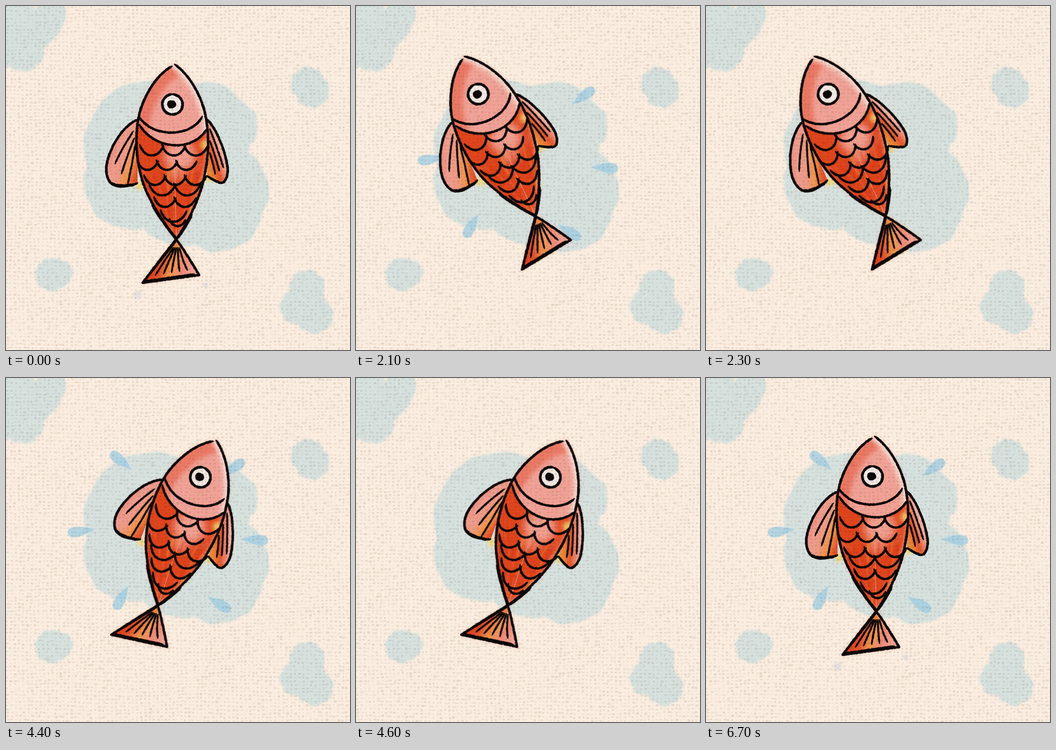
These frames come from a looping animation (748 px wide and 748 px high, 6.8 s). An HTML page with a canvas:

```html
<!DOCTYPE html>
<html lang="en">
<head>
<meta charset="utf-8">
<title>Fish</title>
<style>
  html, body { margin: 0; width: 100%; height: 100%; overflow: hidden; background: #faeddf; }
  main { position: fixed; inset: 0; overflow: clip; contain: strict; isolation: isolate; }
  canvas { position: absolute; left: 0; top: 0; width: 748px; height: 748px; transform-origin: 0 0; }
  .weave { mix-blend-mode: multiply; }
</style>
</head>
<body>
<main></main>
<script>
const SIZE = 748, RES = 2, LOOP = 6800;

let seed = 7;
const rnd = () => (seed = seed * 16807 % 2147483647) / 2147483647;
const spread = n => (rnd() - 0.5) * 2 * n;
const range = n => [...Array(n).keys()];

function layer(name) {
  const c = document.createElement('canvas');
  c.width = c.height = SIZE * RES;
  c.className = name;
  document.querySelector('main').append(c);
  const g = c.getContext('2d');
  g.scale(RES, RES);
  g.lineCap = g.lineJoin = 'round';
  return g;
}
const blur = (g, px) => { g.filter = px ? `blur(${px * RES}px)` : 'none'; };

function disc(g, x, y, r, colour) {
  g.fillStyle = colour;
  g.beginPath();
  g.arc(x, y, r, 0, 2 * Math.PI);
  g.fill();
}

// ---- paper
// Each wash is a few overlapping uneven discs: x, y, radius.
const washes = [
  [[30, 8, 99], [38, 98, 44], [4, 100, 34]],
  [[656, 169, 36], [666, 184, 37]],
  [[100, 584, 36], [118, 580, 27]],
  [[655, 612, 38], [634, 654, 38], [671, 672, 40]],
  [[316, 307, 146], [430, 270, 105], [489, 262, 58], [470, 402, 101], [460, 435, 99], [270, 385, 100], [380, 420, 101]]
];

function unevenDisc(g, x, y, r) {
  const turn = rnd() * 6;
  g.beginPath();
  for (let a = 0; a < 2 * Math.PI; a += 0.05) {
    const edge = r + 1.6 * Math.sin(7 * a + turn) + 1.1 * Math.sin(13 * a - turn);
    g.lineTo(x + edge * Math.cos(a), y + edge * Math.sin(a));
  }
  g.fill();
}

function drawPaper(g) {
  g.fillStyle = '#fbeee0';
  g.fillRect(0, 0, SIZE, SIZE);
  blur(g, 1.8);
  g.fillStyle = '#d7e2df';
  for (const parts of washes) for (const part of parts) unevenDisc(g, ...part);
  disc(g, 63, 0, 6, '#f8ece0');
}

function drawWeave(g) {
  blur(g, 0);
  for (const row of range(96)) {
    for (const col of range(86)) {
      const x = col * 8.8 + 2 * Math.sin(row / 7 + col / 5) + spread(1.2);
      const y = row * 7.9 + 2 * Math.sin(col / 6 + row / 4) + spread(0.9);
      g.fillStyle = `rgba(150,132,120,${0.05 + rnd() * 0.15})`;
      g.beginPath();
      g.roundRect(x, y, 5.6 + spread(1.8), 4.3 + spread(1.2), 1.8);
      g.fill();
    }
  }
}

// ---- water drops: x, y, outward angle in degrees
const drops = [[250, 180, 220], [495, 196, -35], [163, 333, 172], [541, 352, 4], [251, 478, 120], [463, 491, 33]];

function drawDrops(g, reach) {
  const len = 30, w = 22;
  blur(g, 0.8);
  for (const [x, y, deg] of drops) {
    g.save();
    g.translate(347 + (x - 352) * reach, 370 + (y - 335) * reach);
    g.rotate(deg * Math.PI / 180);
    g.fillStyle = 'rgba(158,205,227,.75)';
    g.beginPath();
    g.moveTo(-len, 0);
    g.bezierCurveTo(-len / 3, -w * 0.3, len / 4, -w * 0.75, len * 0.8, -w * 0.42);
    g.bezierCurveTo(len * 1.08, -w * 0.1, len, w * 0.4, len * 0.6, w * 0.46);
    g.bezierCurveTo(len * 0.2, w * 0.6, -len / 3, w * 0.35, -len, 0);
    g.fill();
    g.restore();
  }
}

function drawSmudges(g) {
  blur(g, 2.5);
  disc(g, 286, 628, 9, 'rgba(196,204,220,.42)');
  disc(g, 434, 607, 6, 'rgba(196,204,220,.42)');
}

// ---- fish outlines
const leftSide = 'M361 131 C325 150 297 200 288 243 C280 290 283 335 298 385 C312 425 345 475 371 508';
const rightSide = 'M367 127 C400 150 428 200 435 245 C443 290 440 335 428 385 C416 430 392 475 370 508';
const leftFin = 'M287 247 C255 258 223 310 218 350 C217 386 235 396 262 391 C273 390 281 388 286 385';
const rightFin = 'M438 247 C460 270 480 325 482 355 C482 380 472 388 462 383 C450 379 443 373 437 369';
const tail = 'M371 508 C385 527 405 560 420 585 L297 602 C322 570 348 535 371 508';
const gills = ['M289 240 C318 288 404 286 427 240', 'M290 258 C322 312 405 320 437 267'];

const body = `${leftSide} L361 131 L367 127 ${rightSide.slice(8)} L361 131 Z`;
const head = 'M361 131 L367 127 C400 150 428 200 435 245 L437 267 C405 320 322 312 290 258 L288 243 C297 200 325 150 361 131 Z';

// Scale rows: y, left, right, number of scales.
const scaleRows = [
  [303, 293, 437, 3], [337, 287, 413, 3], [369, 302, 434, 3], [387, 313, 421, 2],
  [417, 324, 411, 2], [445, 338, 391, 1], [464, 357, 389, 1]
];
const scales = scaleRows.flatMap(([y, left, right, n]) => range(n).map(i => {
  const w = (right - left) / n, x = left + i * w, dip = y + w * 0.62;
  return `M${x - 2} ${y - 2} C${x + w * 0.15} ${dip} ${x + w * 0.8} ${dip} ${x + w + 2} ${y}`;
}));

const leftRays = range(3).map(i =>
  `M${277 + 2 * i} ${272 + 15 * i} Q${253 + 11 * i} ${308 + 16 * i} ${237 + 14 * i} ${343 + 22 * i}`);
const rightRays = range(3).map(i =>
  `M443 ${267 + 26 * i} Q${460 - 5 * i} ${310 + 15 * i} ${473 - 9 * i} ${352 + 7 * i}`);
const tailRays = range(5).map(i =>
  `M${364 + 3.3 * i} 525 Q${344 + 10 * i} 555 ${325 + 17.5 * i} ${585 - 2.5 * i}`);

// A dry brush: many small uneven dots along the path.
function brush(g, width, ...paths) {
  const path = document.createElementNS('http://www.w3.org/2000/svg', 'path');
  for (const d of paths) {
    path.setAttribute('d', d);
    const total = path.getTotalLength();
    for (let s = 0; s < total; s += 0.55) {
      const p = path.getPointAtLength(s);
      const taper = Math.min(1, 0.55 + Math.min(s, total - s) / 14);
      disc(g, p.x + spread(0.5), p.y + spread(0.5), width / 2 * taper * (0.75 + rnd() * 0.42), 'rgba(14,9,9,.92)');
    }
  }
}

function drawInk(g) {
  brush(g, 5, leftSide, rightSide, tail, leftFin, rightFin);
  brush(g, 6, 'M318 432 Q342 473 371 507 L314 580', 'M404 453 Q390 482 371 507', 'M299 600 L409 584', 'M226 383 Q240 396 280 388');
  brush(g, 4.8, ...gills);
  brush(g, 4.7, ...scales);
  brush(g, 3.8, ...leftRays, ...rightRays, ...tailRays);
}

// ---- fish colours
function blend(g, x1, y1, x2, y2, ...colours) {
  const fill = g.createLinearGradient(x1, y1, x2, y2);
  colours.forEach((c, i) => fill.addColorStop(i / (colours.length - 1), c));
  return fill;
}

function inside(g, area, fill, detail) {
  g.save();
  g.clip(new Path2D(area));
  g.fillStyle = fill;
  g.fillRect(0, 0, SIZE, SIZE);
  detail?.();
  g.restore();
}

// A soft band of colour that follows an edge.
function shade(g, edge, colour, width, soft) {
  blur(g, soft);
  g.strokeStyle = colour;
  g.lineWidth = width;
  g.stroke(new Path2D(edge));
}

function streaks(g) {
  const tones = ['#d23312', '#f29a44', '#ee775a', '#d83815'];
  blur(g, 1.5);
  g.globalAlpha = 0.4;
  for (const i of range(80)) {
    const x = 290 + rnd() * 145, y = 340 + rnd() * 140;
    g.strokeStyle = tones[i % tones.length];
    g.lineWidth = 2 + rnd() * 3;
    g.beginPath();
    g.moveTo(x, y);
    g.lineTo(x + (370 - x) * 0.15, y + 12 + rnd() * 16);
    g.stroke();
  }
}

function drawColours(g) {
  g.save();
  for (const area of [body, tail]) shade(g, area, 'rgba(240,140,120,.33)', 6, 4);
  for (const [x, y] of [[290, 391], [441, 374]]) disc(g, x, y, 9, 'rgba(250,215,90,.75)');
  g.restore();

  inside(g, leftFin, blend(g, 222, 320, 292, 345, '#ea8875', '#ef9e8f', '#ee9a85', '#f0954a', '#e2512c'));
  inside(g, rightFin, blend(g, 434, 335, 482, 318, '#ec8a3c', '#e4572c', '#ee9f8e', '#f6e9de'));
  inside(g, tail, blend(g, 320, 550, 405, 575, '#dc3c1a', '#e2552f', '#f0984e', '#ee8a76', '#f0a294'));
  inside(g, body, '#e0451d', () => {
    blur(g, 9);
    disc(g, 378, 325, 35, '#f2a091');
    disc(g, 372, 365, 16, '#ef8d74');
    shade(g, rightSide, '#ee8a66', 10, 5);
    disc(g, 434, 302, 11, '#f3c468');
    streaks(g);
  });
  inside(g, head, '#f1a296', () => {
    shade(g, leftSide, '#ea7964', 52, 5);
    shade(g, rightSide, '#f7ddd3', 20, 5);
  });
}

function drawEye(g) {
  disc(g, 362, 214, 22, '#f3e9e3');
  brush(g, 5.4, 'M362 192 a22 22 0 1 1 -.1 0');
  brush(g, 9, 'M360 208 a5 5 0 1 1 -.1 0');
}

const paper = layer('paper'), smudges = layer('smudges'), near = layer('drops'), far = layer('drops');
const fish = layer('fish'), weave = layer('weave');
drawPaper(paper);
drawSmudges(smudges);
near.translate(5, -35);
drawDrops(near, 1);
drawDrops(far, 1.65);
drawColours(fish);
drawInk(fish);
drawEye(fish);
drawWeave(weave);

// ---- motion: held steps of [time, value]
function play(g, prop, steps) {
  const frames = [...steps, [LOOP, steps.at(-1)[1]]].map(([t, v]) => ({
    [prop]: v, offset: t / LOOP, easing: 'steps(1, end)'
  }));
  g.canvas.animate(frames, { duration: LOOP, iterations: Infinity });
}

// The fish leans around the point where body and tail meet.
const pose = (x, y, lean, skew = 0, tall = 1, wide = 1) =>
  `translate(${x}px, ${y}px) skewX(${skew}deg) scale(${wide}, ${tall}) rotate(${lean}deg) translate(-370px, -507px)`;

const upright = pose(370, 507, 0), left = pose(390, 457, -23.5), right = pose(330, 494, 20);
const leaps = [2000, 4300, 6600], STEP = 100;

play(fish, 'transform', [
  [0, upright],
  [leaps[0], pose(360, 497, 0, 4.5, 1.067)], [leaps[0] + STEP, left],
  [leaps[1], pose(393, 446, -23.5, -7.4, 1.092)], [leaps[1] + STEP, right],
  [leaps[2], pose(353, 492, 2, -5.8, 0.977, 1.03)], [leaps[2] + STEP, upright]
]);

// Drops burst once the fish has landed, first close, then wide.
const burst = (g, delay) => play(g, 'opacity', [[0, 0], ...leaps.flatMap(t =>
  [[t + delay, 1], [t + delay + STEP, 0]]).filter(([t]) => t < LOOP)]);
burst(near, STEP);
burst(far, 2 * STEP);
play(smudges, 'opacity', [[0, 1], [leaps[0], 0], [leaps[2] + STEP, 1]]);
</script>
</body>
</html>
```
